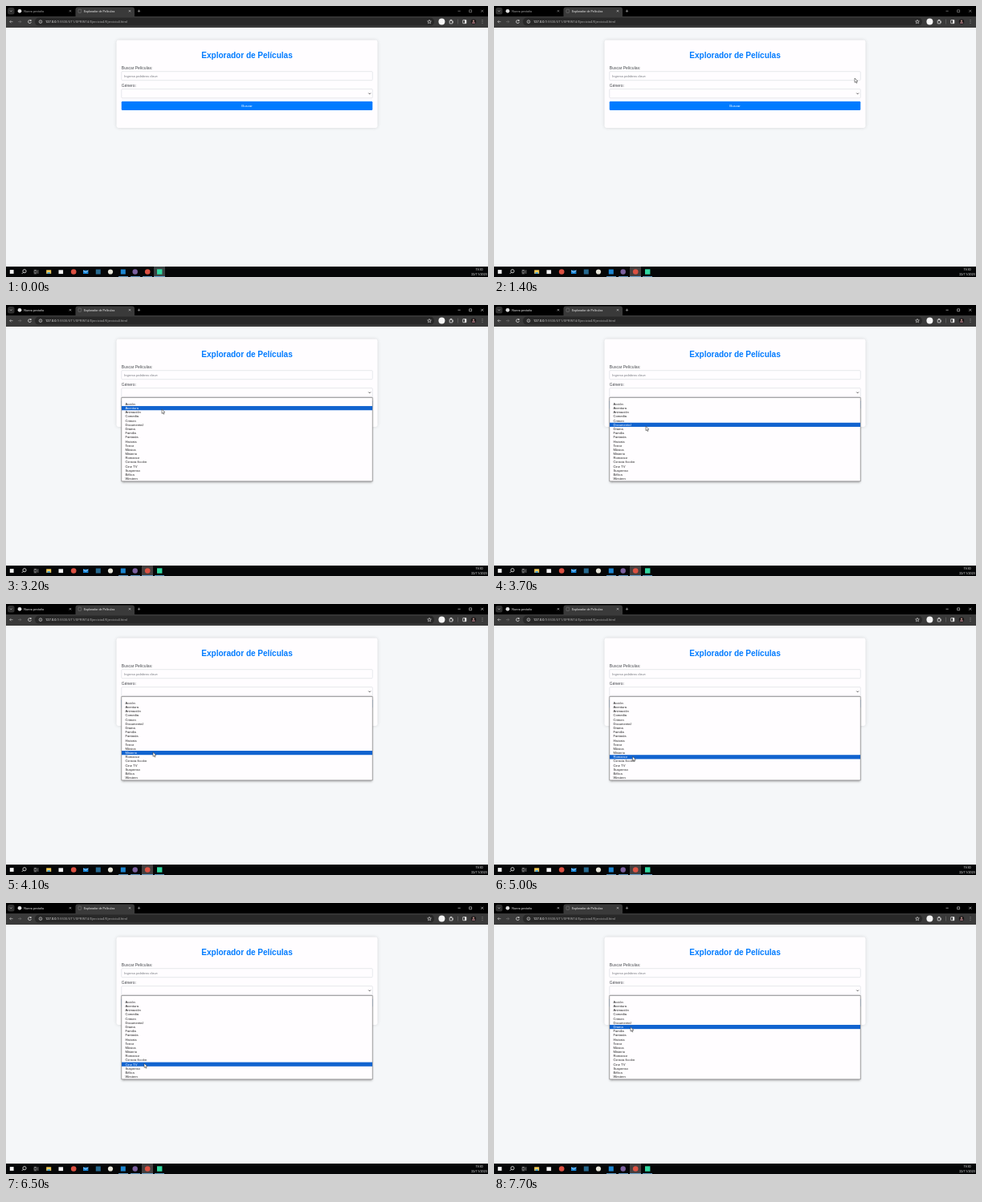
An HTML page with a canvas that plays this animation: 600 by 338 pixels, repeating every 8 s.

```html
<!DOCTYPE html>
<html lang="es">
<head>
<meta charset="utf-8">
<title>Explorador de Películas</title>
<style>
html, body { margin: 0; width: 100%; height: 100%; overflow: hidden; background: #f5f7f9; }
canvas { display: block; width: 600px; height: 338px; }
</style>
</head>
<body>
<canvas id="stage"></canvas>
<script>
const W = 600, H = 338, LOOP = 8000, STEP = 100;
const canvas = document.getElementById('stage');
const ctx = canvas.getContext('2d');
const dpr = window.devicePixelRatio || 1;
canvas.width = W * dpr;
canvas.height = H * dpr;

const ARIAL = '"Liberation Sans", Arial, sans-serif';
const UI = 'Roboto, "Noto Sans", sans-serif';
const BLUE = '#007bff';
const GENRES = ['', 'Acción', 'Aventura', 'Animación', 'Comedia', 'Crimen', 'Documental',
  'Drama', 'Familia', 'Fantasía', 'Historia', 'Terror', 'Música', 'Misterio', 'Romance',
  'Ciencia ficción', 'Cine TV', 'Suspenso', 'Bélica', 'Western'];
const ROW = 5.18, LIST_TOP = 115.7;

// Pointer tip: time, x, y
const PATH = [
  [100, 187, 332], [300, 177, 329], [500, 174, 280], [700, 170, 150], [900, 166, 70],
  [1000, 172, 62], [1200, 290, 58], [1400, 449, 90], [1600, 425, 160], [1800, 352, 196],
  [1900, 337, 196], [2100, 300, 160], [2300, 236, 100], [2500, 198, 112], [2800, 198, 112],
  [3200, 194, 130], [3600, 190, 150], [3700, 189, 151.3], [4100, 183, 184.8],
  [4400, 179, 203], [4500, 178, 205], [4700, 176, 201], [5000, 172.5, 190.2],
  [5300, 171, 179], [5700, 171, 171.6], [5900, 171, 161], [6200, 172, 179],
  [6500, 172, 200], [6800, 172, 180], [7100, 170, 154.5], [7300, 172, 156],
  [7500, 169, 154.5], [7700, 170, 154.7], [8000, 170, 154.7]
];

function pointer(t) {
  let i = 1;
  while (i < PATH.length - 1 && PATH[i][0] < t) i++;
  const [t0, x0, y0] = PATH[i - 1], [t1, x1, y1] = PATH[i];
  const k = Math.max(0, Math.min(1, (t - t0) / (t1 - t0)));
  return [x0 + (x1 - x0) * k, y0 + (y1 - y0) * k];
}

function rect(x, y, w, h, fill) {
  ctx.fillStyle = fill;
  ctx.fillRect(x, y, w, h);
}

function box(x, y, w, h, r, fill, stroke, lw = 0.5) {
  ctx.beginPath();
  ctx.roundRect(x, y, w, h, r);
  if (fill) { ctx.fillStyle = fill; ctx.fill(); }
  if (stroke) { ctx.strokeStyle = stroke; ctx.lineWidth = lw; ctx.stroke(); }
}

function disc(x, y, r, fill, stroke, lw = 0.7) {
  ctx.beginPath();
  ctx.arc(x, y, r, 0, Math.PI * 2);
  if (fill) { ctx.fillStyle = fill; ctx.fill(); }
  if (stroke) { ctx.strokeStyle = stroke; ctx.lineWidth = lw; ctx.stroke(); }
}

function line(points, color, lw = 0.7) {
  ctx.beginPath();
  for (let i = 0; i < points.length; i += 2) ctx.lineTo(points[i], points[i + 1]);
  ctx.strokeStyle = color;
  ctx.lineWidth = lw;
  ctx.stroke();
}

function text(s, x, y, size, color, family = ARIAL, align = 'left', weight = '') {
  ctx.font = `${weight} ${size}px ${family}`;
  ctx.textAlign = align;
  ctx.fillStyle = color;
  ctx.fillText(s, x, y);
  return ctx.measureText(s).width;
}

function cross(x, y, r, color) {
  line([x - r, y - r, x + r, y + r], color, 0.6);
  line([x - r, y + r, x + r, y - r], color, 0.6);
}

function shadow(color, blur, dy = 0) {
  ctx.shadowColor = color;
  ctx.shadowBlur = blur * dpr;
  ctx.shadowOffsetY = dy * dpr;
}

function drawTabs(active) {
  const dim = active ? '#e4e4e4' : '#a4a4a4';
  rect(0, 0, W, 13, '#000');
  box(2, 2, 8.5, 8.5, 2.5, '#303030');
  line([5, 5.6, 6.3, 6.9, 7.6, 5.6], '#ddd', 0.6);
  disc(17, 6.3, 2.4, '#dedede');
  text('Nueva pestaña', 22.2, 7.8, 3.75, dim, UI);
  cross(80, 6.3, 1.1, dim);

  box(86.5, 1.5, 73.5, 13, [3, 3, 0, 0], '#3a3a3a');
  box(90, 4.2, 3.6, 4.2, 0.6, null, '#858585');
  text('Explorador de Películas', 97, 7.8, 3.7, '#f0f0f0', UI);
  cross(154, 6.3, 1.1, '#ddd');
  line([163.8, 6.3, 167.2, 6.3], '#bbb', 0.6);
  line([165.5, 4.6, 165.5, 8], '#bbb', 0.6);

  line([562.5, 6.3, 565.7, 6.3], dim, 0.6);
  box(576.7, 4.9, 2.9, 2.9, 0, null, dim, 0.6);
  cross(592.8, 6.3, 1.5, dim);
}

function drawToolbar() {
  rect(0, 13, W, 14, '#3a3a3a');
  line([8.5, 19.6, 4.7, 19.6], '#ccc', 0.6);
  line([6.4, 17.9, 4.7, 19.6, 6.4, 21.3], '#ccc', 0.6);
  line([15, 19.6, 18.8, 19.6], '#777', 0.6);
  line([17.1, 17.9, 18.8, 19.6, 17.1, 21.3], '#777', 0.6);
  ctx.beginPath();
  ctx.arc(29.5, 19.6, 1.9, 0.2, 5.4);
  ctx.strokeStyle = '#eee';
  ctx.lineWidth = 0.7;
  ctx.stroke();
  rect(30, 17.4, 1.6, 1.3, '#eee');

  box(36, 14.6, 497, 10, 5, '#282828');
  disc(43, 19.6, 1.9, null, '#ddd', 0.6);
  rect(42.7, 19.2, 0.6, 1.5, '#ddd');
  rect(42.7, 18.3, 0.6, 0.5, '#ddd');
  const host = text('127.0.0.1', 49, 21.1, 4.08, '#fff', UI);
  text(':5500/UT1/SPRINT4/Ejercicio4/Ejercicio4.html', 49 + host, 21.1, 4.08, '#a8a8a8', UI);

  ctx.beginPath();
  for (let i = 0; i < 10; i++) {
    const a = -Math.PI / 2 + i * Math.PI / 5, r = i % 2 ? 1.1 : 2.5;
    ctx.lineTo(527 + r * Math.cos(a), 19.7 + r * Math.sin(a));
  }
  ctx.closePath();
  ctx.strokeStyle = '#ddd';
  ctx.lineWidth = 0.6;
  ctx.stroke();

  disc(542.4, 19.6, 4, '#f5f5f5');
  box(552.2, 18, 3.7, 3.9, 0.4, null, '#e5e5e5', 0.8);
  disc(554, 17.7, 0.9, '#e5e5e5');
  disc(556.1, 20, 0.8, '#e5e5e5');
  rect(562.5, 16.5, 0.5, 6, '#777');
  box(568.7, 17.5, 4.2, 4.2, 0.4, null, '#eee', 0.7);
  rect(571, 17.5, 1.9, 4.2, '#eee');
  disc(582, 19.6, 3.2, '#1b1718');
  disc(582, 18.7, 1.1, '#b99086');
  box(580, 20.1, 4, 1.9, 1, '#8b626a');
  for (const y of [17.8, 19.6, 21.4]) disc(593, y, 0.45, '#ddd');
}

function field(y, h) {
  box(143.75, y, 312.5, h, 1, '#fffdff', '#ced2d8', 0.5);
}

function drawPage() {
  rect(0, 27, W, 298, '#f5f7f9');
  shadow('rgba(0,0,0,0.14)', 4);
  box(137.5, 42.5, 325, 109.5, 2.4, '#fffdff');
  shadow('transparent', 0);
  text('Explorador de Películas', 300, 65, 10, BLUE, ARIAL, 'center', 'bold');
  text('Buscar Películas:', 143.8, 78.5, 5, '#45494d');
  field(81.7, 11);
  text('Ingresa palabras clave', 147, 88.7, 4.17, '#777b80');
  text('Género:', 143.8, 100.6, 5, '#45494d');
  field(103.6, 11.2);
  line([451.3, 108.6, 452.6, 109.9, 453.9, 108.6], '#222', 0.8);
  box(143.75, 119, 312.5, 11, 1.2, BLUE);
  text('Buscar', 300, 126, 4.3, '#fff', ARIAL, 'center');
}

function drawListFrame() {
  ctx.save();
  ctx.beginPath();
  ctx.rect(0, 0, W, H);
  ctx.rect(143.75, 115.5, 312.5, 104.3);
  ctx.clip('evenodd');
  shadow('rgba(0,0,0,0.45)', 3, 0.8);
  rect(143.75, 115.5, 312.5, 104.3, '#999');
  ctx.restore();
}

function drawList(tipY) {
  const hot = Math.max(0, Math.min(GENRES.length - 1, Math.floor((tipY - LIST_TOP) / ROW)));
  box(143.75, 115.5, 312.5, 104.3, 0, '#fffdff', '#777', 0.6);
  rect(144, LIST_TOP + hot * ROW, 312, ROW, '#1163cf');
  GENRES.forEach((name, i) => {
    text(name, 148.4, LIST_TOP + i * ROW + 4.05, 4.17, i === hot ? '#fff' : '#202020');
  });
}

function drawTaskbar(hot) {
  const y = 331.5;
  rect(0, 325, W, 13, '#050607');
  rect(hot - 7, 325, 14, 13, hot === 191 ? '#3b4344' : '#443f3f');
  rect(4.8, y - 2.4, 4.8, 4.8, '#f2f2f2');
  disc(23, y - 0.8, 2.1, null, '#eee', 0.8);
  line([21.5, y + 0.7, 19.7, y + 2.5], '#eee', 0.8);
  box(35, y - 1.1, 3, 2.3, 0, null, '#ddd', 0.5);
  line([34.7, y - 2.2, 38.2, y - 2.2], '#ddd', 0.5);
  line([34.7, y + 2.3, 38.2, y + 2.3], '#ddd', 0.5);
  line([39.8, y - 2.3, 39.8, y + 2.4], '#ddd', 0.5);
  rect(50.2, y - 2.2, 6, 4.6, '#f3ca58');
  rect(51.5, y + 0.6, 3.4, 1.8, '#3aa0dd');
  rect(65.5, y - 2.2, 5.6, 4.8, '#f2f2f2');
  disc(84.2, y, 3.3, '#dc5142');
  rect(96, y - 1.9, 6.4, 4.4, '#1687d9');
  line([96, y - 1.7, 99.2, y + 0.6, 102.4, y - 1.7], '#eef', 0.7);
  rect(111.8, y - 3, 6, 6, '#27698f');
  disc(130, y, 3.1, '#e7e5d9');
  rect(142.8, y - 3, 6, 6, '#1c86d1');
  disc(160.7, y, 3.2, '#7b619f');
  disc(176.2, y, 3.3, '#dc5142');
  rect(188, y - 3.2, 6.4, 6.4, '#31d8a1');
  for (const x of [146, 161, 176, 191]) {
    const half = x === hot ? 7 : 6;
    rect(x - half, 337.2, half * 2, 0.8, '#76b9ed');
  }
  text('19:30', 589, 330.3, 3.7, '#eee', UI, 'center');
  text('22/11/2023', 589, 336, 3.7, '#eee', UI, 'center');
}

function drawPointer(x, y) {
  const shape = [0, 0, 0, 5.4, 1.25, 4.3, 2.1, 6.2, 3, 5.8, 2.2, 3.9, 3.9, 3.8];
  ctx.beginPath();
  for (let i = 0; i < shape.length; i += 2) ctx.lineTo(x + shape[i], y + shape[i + 1]);
  ctx.closePath();
  ctx.fillStyle = '#fff';
  ctx.fill();
  ctx.strokeStyle = '#333';
  ctx.lineWidth = 0.55;
  ctx.stroke();
}

function draw(t) {
  const [x, y] = pointer(t);
  const open = t >= 2800;
  ctx.setTransform(dpr, 0, 0, dpr, 0, 0);
  drawTabs(open);
  drawToolbar();
  drawPage();
  if (t >= 2700) drawListFrame();
  if (open) drawList(y);
  drawTaskbar(t < 400 ? 191 : 176);
  if (t >= 100) drawPointer(x, y);
}

const start = performance.now();
function tick() {
  const t = (performance.now() - start) % LOOP;
  draw(Math.floor(t / STEP) * STEP);
  requestAnimationFrame(tick);
}
tick();
</script>
</body>
</html>
```
